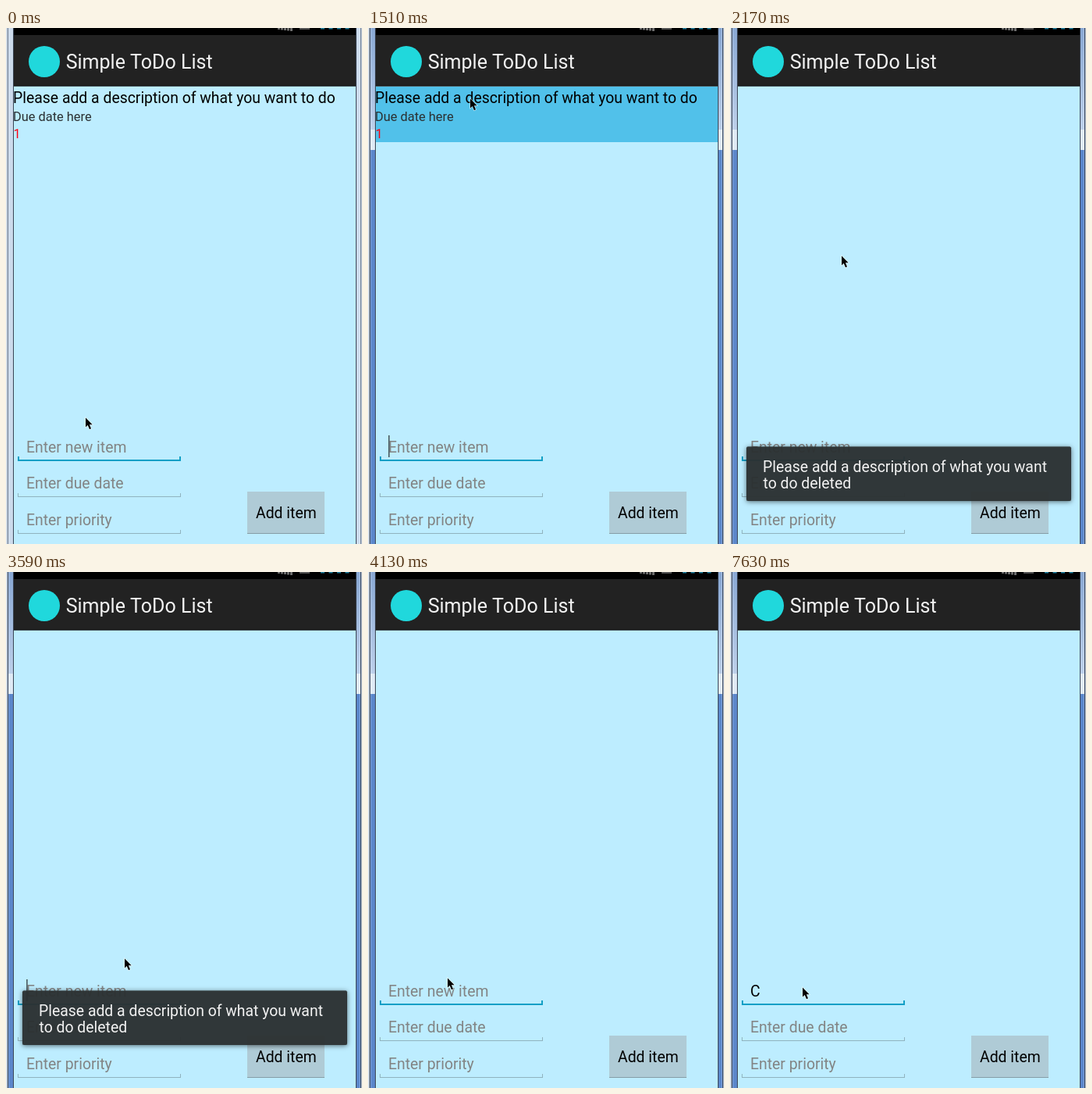
An HTML page with a canvas for the animation above (8000 ms loop, 456 px wide and 660 px high).

```html
<!DOCTYPE html>
<html lang="en">
<head>
<meta charset="utf-8">
<title>Simple ToDo List</title>
<style>
html, body { margin: 0; width: 100%; height: 100%; overflow: hidden; background: #bdedff; }
canvas { display: block; width: 456px; height: 660px; }
</style>
</head>
<body>
<canvas id="stage" width="456" height="660"></canvas>
<script>
const ctx = document.getElementById('stage').getContext('2d');
const LOOP = 8000;
const SAMPLE = 137.5;   // the screen refreshes at this interval
const BLINK = 500, FADE = 500;
const ACTIVATE = 800, PRESS = 1090, REMOVE = 1650, HIDE = 3600, TYPE = 7150;
const HINT = '#828484';
const SIZE = 19.4;

// Pointer stops: time, x, y
const PATH = [
  [138, 102, 498], [275, 122, 142], [412, 122, 132], [550, 131, 90], [2062, 131, 90],
  [2337, 154, 491], [3713, 152, 494], [4125, 102, 519], [4400, 93, 531]
];

const clamp = v => Math.min(1, Math.max(0, v));
const progress = (t, from, span) => clamp((t - from) / span);
const mix = (a, b, p) => a + (b - a) * p;

function pointerAt(t) {
  const i = PATH.findIndex(k => k[0] > t);
  if (i < 0) return PATH[PATH.length - 1].slice(1);
  if (i === 0) return PATH[0].slice(1);
  const [t0, x0, y0] = PATH[i - 1], [t1, x1, y1] = PATH[i];
  const p = progress(t, t0, t1 - t0);
  return [mix(x0, x1, p), mix(y0, y1, p)];
}

function toastAlpha(t) {
  const show = 1 - (1 - progress(t, REMOVE, FADE)) ** 2;
  const hide = 1 - progress(t, HIDE, FADE) ** 2;
  return show * hide;
}

function caretOn(t) {
  const origin = t < TYPE ? 330 : TYPE - 100;
  return Math.floor((t - origin) / BLINK) % 2 === 0;
}

function rect(x, y, w, h, fill) {
  ctx.fillStyle = fill;
  ctx.fillRect(x, y, w, h);
}

function text(str, x, y, size, fill) {
  ctx.font = size + 'px Roboto, sans-serif';
  ctx.fillStyle = fill;
  ctx.fillText(str, x, y);
}

function drawFrame(active) {
  rect(0, 0, 456, 660, active ? '#5b87cb' : '#ccdbec');
  if (active) {
    const glass = ctx.createLinearGradient(0, 0, 0, 130);
    glass.addColorStop(0, '#89a8d4');
    glass.addColorStop(1, '#bdd0ea');
    rect(0, 0, 456, 130, glass);
    rect(0, 130, 456, 26, '#e0eaf5');
  }
  rect(0, 0, 2, 660, '#ccd6e2');
  rect(455, 0, 1, 660, '#ccd6e2');
  for (const x of [2, 454]) rect(x, 0, 1, 660, active ? '#28374f' : '#64748b');
  for (const x of [3, 453]) rect(x, 0, 1, 660, 'rgba(255,255,255,.25)');
  for (const x of [9, 448]) rect(x, 0, 1, 660, '#3b4656');
}

function drawHeader() {
  rect(10, 0, 438, 9, '#000');
  for (let i = 0; i < 5; i++) rect(348 + i * 4, 0, 3, 2 + i / 2, '#6d6d6d');
  rect(376, 0, 13, 2, '#555');
  for (let i = 0; i < 4; i++) rect(403 + i * 10.5, 0, 5, 1.5, '#1d7f9f');
  rect(10, 9, 438, 65, '#222');
  rect(10, 73, 438, 1, '#181818');
  rect(10, 74, 438, 1, '#4b5b61');
  ctx.fillStyle = '#20d8dc';
  ctx.beginPath();
  ctx.arc(49, 43, 20, 0, Math.PI * 2);
  ctx.fill();
  text('Simple ToDo List', 76.7, 52, 25, '#f3f3f3');
}

function drawItem(t) {
  if (t >= PRESS) {
    ctx.globalAlpha = mix(0.69, 0.8, progress(t, PRESS, FADE));
    rect(10, 75, 438, 71, '#33b5e5');
    ctx.globalAlpha = 1;
  }
  text('Please add a description of what you want to do', 9, 96, SIZE, '#000');
  text('Due date here', 9, 119, 16.4, '#2b3133');
  text('1', 9.5, 141, 16.4, '#ff0010');
}

function drawField(y, str, fill, focus) {
  const h = focus ? 2 : 1;
  const line = focus ? '#129fc6' : '#90b3bf';
  rect(15, y, 209, h, line);
  rect(15, y - 4, h, 4, line);
  rect(224 - h, y - 4, h, 4, line);
  text(str, 26, y - (focus ? 9 : 10), SIZE, fill);
}

function drawButton() {
  rect(309, 593, 99, 54, '#afcbd6');
  rect(309, 646, 99, 1, '#869da6');
  text('Add item', 320, 627, SIZE, '#000');
}

function drawToast(alpha) {
  if (!alpha) return;
  const box = new Path2D();
  box.roundRect(21, 535.5, 416, 69.5, 2);
  const outside = new Path2D(box);
  outside.rect(0, 500, 456, 160);

  // The shadow falls outside the box only, so the fade stays even.
  ctx.save();
  ctx.globalAlpha = alpha;
  ctx.clip(outside, 'evenodd');
  ctx.shadowColor = 'rgba(0,0,0,.55)';
  ctx.shadowBlur = 6;
  ctx.shadowOffsetY = 1;
  ctx.fillStyle = '#2b3031';
  ctx.fill(box);
  ctx.restore();

  ctx.save();
  ctx.globalAlpha = alpha;
  ctx.fillStyle = 'rgba(43,48,49,.96)';
  ctx.fill(box);
  ctx.globalAlpha = Math.sqrt(alpha);
  text('Please add a description of what you want', 42, 567.5, SIZE, '#f2f2f2');
  text('to do deleted', 42.5, 589, SIZE, '#f2f2f2');
  ctx.restore();
}

function drawPointer(x, y) {
  const arrow = new Path2D('M0 .5V12.5L2.7 10L5 15.2L7 14.3L4.9 9.3H8.6Z');
  ctx.save();
  ctx.translate(Math.round(x), Math.round(y));
  ctx.strokeStyle = 'rgba(255,255,255,.6)';
  ctx.lineWidth = 1.4;
  ctx.stroke(arrow);
  ctx.fillStyle = '#000';
  ctx.fill(arrow);
  ctx.restore();
}

function draw(time) {
  const t = Math.floor((time + 35) / SAMPLE) * SAMPLE;
  const typed = t >= TYPE;

  drawFrame(t >= ACTIVATE);
  rect(10, 75, 438, 585, '#bdedff');
  drawHeader();
  if (t < REMOVE) drawItem(t);

  drawField(552, typed ? 'C' : 'Enter new item', typed ? '#000' : HINT, true);
  drawField(599, 'Enter due date', HINT, false);
  drawField(646, 'Enter priority', HINT, false);
  if (caretOn(t)) rect(typed ? 37.3 : 26.2, 521, 1.4, 28, '#3a4549');

  drawButton();
  drawToast(toastAlpha(t));
  drawPointer(...pointerAt(t));
}

let start = null;
function tick(now) {
  if (start === null) start = now;
  draw((now - start) % LOOP);
  requestAnimationFrame(tick);
}
draw(0);
requestAnimationFrame(tick);
</script>
</body>
</html>
```
